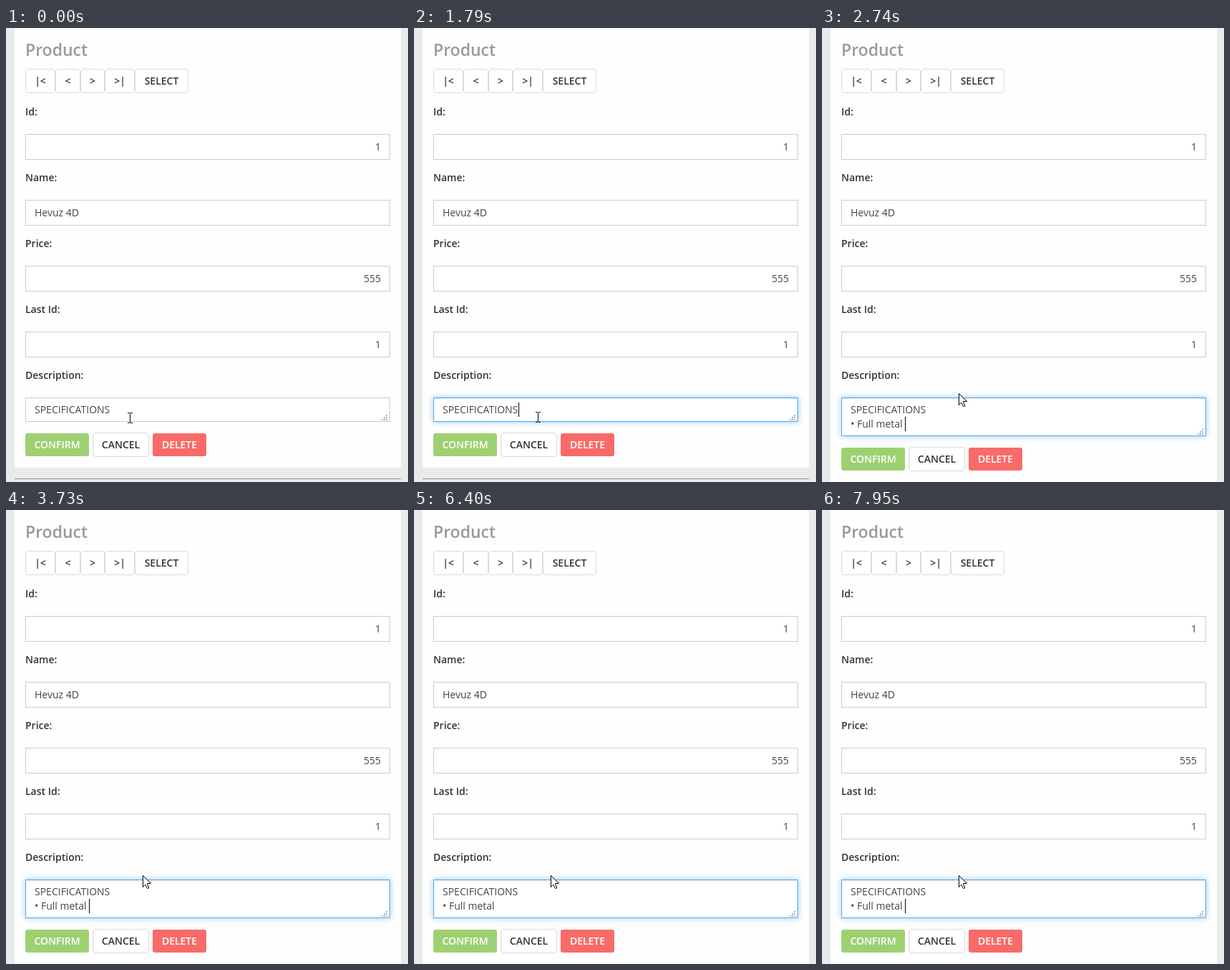
Animation, 562 px wide and 634 px high, one loop 8000 ms. Source, as an HTML page:

```html
<!DOCTYPE html>
<html lang="en">
<head>
<meta charset="utf-8">
<title>Product form</title>
<style>
  html, body { margin: 0; width: 100%; height: 100%; overflow: hidden; background: #e9ebea; }
  #stage { position: relative; width: 562px; height: 634px; overflow: hidden; }
  #stage div { position: absolute; box-sizing: border-box; }
  .panel { background: #fefefe; }
  .rule { background: #8c8c8c; }
  .field { background: #fff; border: 1px solid #ccc; }
  .btn { background: #fff; border: 1px solid #dadada; border-radius: 4px; }
  .ok { background: #9ed072; border-radius: 3px; }
  .del { background: #f86b69; border-radius: 3px; }
  .focus { border-color: #52a8ec; box-shadow: inset 0 1px 1px rgba(0,0,0,.075), 0 0 8px rgba(82,168,236,.6); }
  svg { position: absolute; left: 0; top: 0; }
  text { font: 14px "Open Sans", "Noto Sans", sans-serif; fill: #444; white-space: pre; }
  .bold { font-weight: 600; fill: #333; }
  .light { fill: #fff; }
  .title { font-size: 23px; fill: #999; }
  .mid { text-anchor: middle; }
  .end { text-anchor: end; }
  .crisp { shape-rendering: crispEdges; }
</style>
</head>
<body>
<div id="stage"></div>
<script>
const stage = document.getElementById("stage");

function box(cls, x, y, w, h) {
  const el = document.createElement("div");
  el.className = cls;
  el.style.cssText = `left:${x}px;top:${y}px;width:${w}px;height:${h}px`;
  return stage.appendChild(el);
}

const panel = box("panel", 12, 0, 540, 614);
const rule = box("rule", 12, 629, 540, 1);

const svg = document.createElementNS("http://www.w3.org/2000/svg", "svg");
svg.setAttribute("width", 562);
svg.setAttribute("height", 634);

function shape(tag, attrs, parent = svg) {
  const el = document.createElementNS(svg.namespaceURI, tag);
  for (const k in attrs) el.setAttribute(k, attrs[k]);
  return parent.appendChild(el);
}

function label(str, x, y, cls = "", parent = svg) {
  const el = shape("text", { x, y, class: cls }, parent);
  el.textContent = str;
  return el;
}

label("Product", 27, 39, "bold title");

[["|<", 27, 42], ["<", 69, 35], [">", 104, 34], [">|", 138, 42], ["SELECT", 180, 75]].forEach(([str, x, w]) => {
  box("btn", x, 57, w, 34);
  label(str, x + w / 2, 79, "bold mid");
});

[["Id:", "1"], ["Name:", "Hevuz 4D"], ["Price:", "555"], ["Last Id:", "1"]].forEach(([name, value], i) => {
  const y = 92 * i;
  label(name, 27, 122 + y, "bold");
  box("field", 27, 148 + y, 510, 36);
  if (name === "Name:") label(value, 40, 171 + y);
  else label(value, 524, 171 + y, "end");
});

label("Description:", 27, 490, "bold");
const area = box("field", 27, 516, 510, 34);
label("SPECIFICATIONS", 40, 538);
const line2 = label("• Full metal ", 40, 558);

// Everything that drops when the text area grows
const buttons = [
  box("ok", 27, 566, 89, 32),
  box("btn", 121, 565, 79, 34),
  box("del", 205, 566, 75, 32)
];
const lower = shape("g", {});
label("CONFIRM", 71.5, 587, "bold light mid", lower);
label("CANCEL", 160.5, 587, "bold mid", lower);
label("DELETE", 242.5, 587, "bold light mid", lower);
for (let r = 0; r < 3; r++)
  for (let c = 2 - r; c < 3; c++)
    shape("rect", { x: 525 + c * 3, y: 540 + r * 3, width: 2, height: 2, fill: "#b0b0b0", class: "crisp" }, lower);

const caret = shape("rect", { width: 1, height: 20, fill: "#000", class: "crisp" });
const beam = shape("path", {
  d: "M170 537h3v1h1v-1h3v1h-3v13h3v1h-3v-1h-1v1h-3v-1h3v-13h-3z", fill: "#000", class: "crisp"
});
const arrow = shape("path", {
  d: "M191.5 510.5V526.5L195 523.2L197.5 528.6L199.9 527.6L197.5 522.2V521.5H202.5Z",
  fill: "#fff", stroke: "#000", "stroke-width": 1
});
stage.appendChild(svg);

const LOOP = 8000, GROW = 2740;
const blinks = [680, 1230, 1790, 2340, 2740, 3170, 3730, 4320, 4730, 5290, 5870, 6400, 6960, 7390, 7950];
const show = (el, on) => el.setAttribute("visibility", on ? "visible" : "hidden");

function draw(t) {
  const grown = t >= GROW, drop = grown ? 20 : 0;
  area.className = t >= 680 ? "field focus" : "field";
  area.style.height = 34 + drop + "px";
  panel.style.height = 614 + drop + "px";
  rule.style.visibility = grown ? "hidden" : "visible";
  buttons.forEach(b => b.style.transform = `translateY(${drop}px)`);
  lower.setAttribute("transform", `translate(0 ${drop})`);
  show(line2, grown);

  show(caret, blinks.filter(b => b <= t).length % 2);
  caret.setAttribute("x", grown ? 116 : 146);
  caret.setAttribute("y", 523 + drop);

  show(beam, t < 1910);
  beam.setAttribute("transform", `translate(0 ${t < 1230 ? 0 : -1})`);
  show(arrow, t >= 1910);
}

const start = performance.now();
function tick() {
  draw((performance.now() - start) % LOOP);
  requestAnimationFrame(tick);
}
tick();
</script>
</body>
</html>
```
